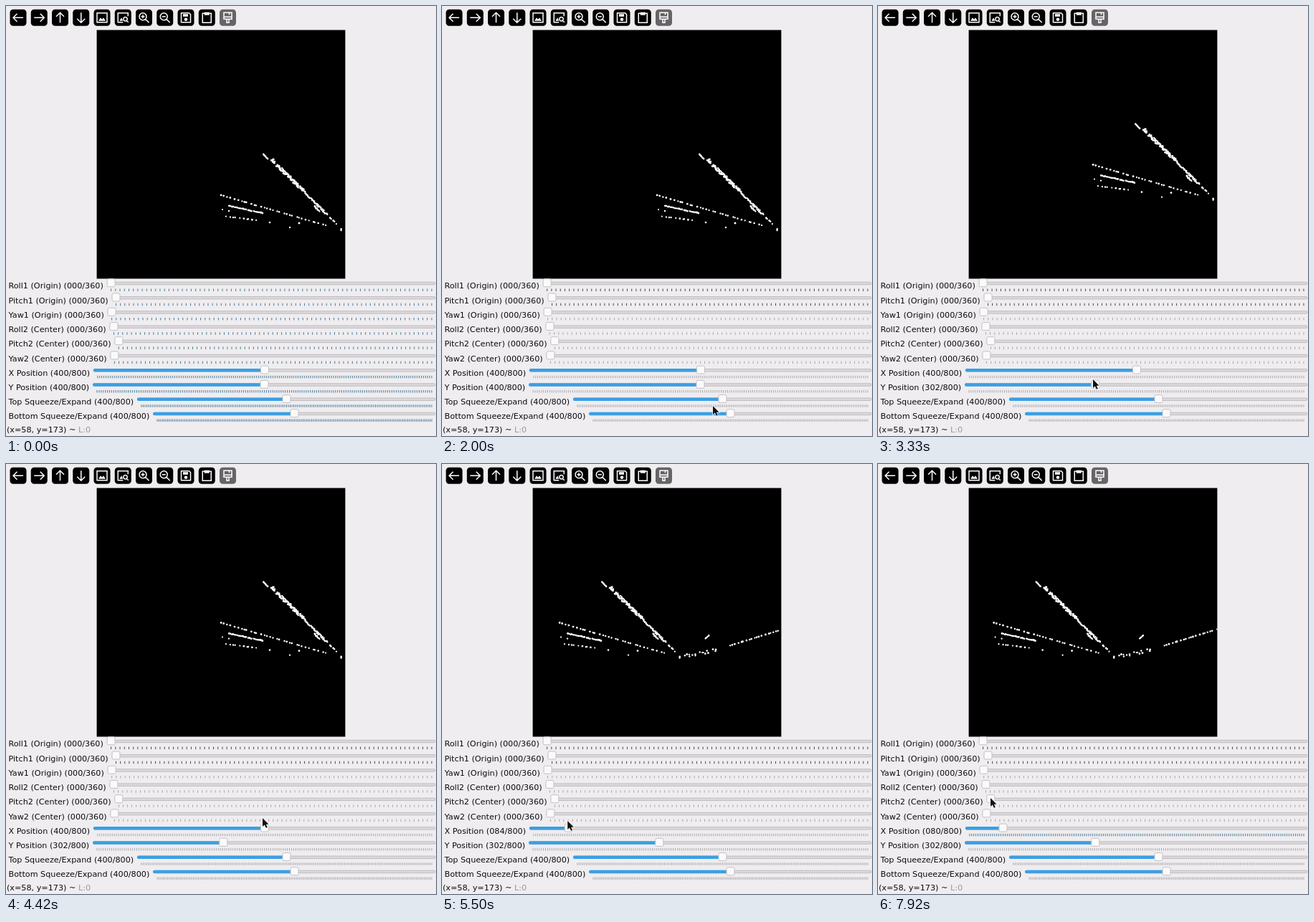
These frames come from a looping animation (600 by 600 pixels, 8 s). An HTML page with a canvas:

```html
<!DOCTYPE html>
<html>
<head>
<meta charset="utf-8">
<style>
html, body { margin: 0; width: 100%; height: 100%; overflow: hidden; background: #efedef; }
canvas { display: block; width: 600px; height: 600px; }
</style>
</head>
<body>
<canvas id="stage" width="600" height="600"></canvas>
<script>
const ctx = document.getElementById('stage').getContext('2d');
const LOOP = 8000, FPS = 12, VIEW_SCALE = 346 / 800;
const INK = '#0c0c0e', PAPER = '#efedef', BLUE = '#3a9fe3';

// Drags ease out towards the value where the mouse lets go
const drag = (start, length, from, to, power) => t => {
  const p = Math.min(1, Math.max(0, (t - start) / length));
  return to + (from - to) * (1 - p) ** power;
};
const xDrag = { start: 4.417, end: 5.597 };
const xPosition = drag(xDrag.start, 1.18, 400, 80, 1.765);
const yPosition = drag(2.92, 0.38, 400, 302, 1);

// Cursor stops: seconds, x, y
const stops = [
  [0.08, 1, 12], [0.83, 35, 273], [1.25, 116, 418], [2, 378, 558], [2.92, 358, 521], [3.3, 300, 521],
  [3.6, 300, 521], [4.417, 358, 494], [4.917, 358, 494], [5.5, 175, 498], [6.1, 173, 499],
  [6.75, 155, 462], [7.33, 156, 462], [7.91, 157, 466]
];

function cursorAt(t) {
  const i = stops.findIndex(s => s[0] > t);
  if (i < 0) return stops[stops.length - 1].slice(1);
  const [t0, x0, y0] = stops[i - 1], [t1, x1, y1] = stops[i], p = (t - t0) / (t1 - t0);
  return [x0 + (x1 - x0) * p, y0 + (y1 - y0) * p];
}

const sliders = [
  ...['Roll1 (Origin)', 'Pitch1 (Origin)', 'Yaw1 (Origin)', 'Roll2 (Center)', 'Pitch2 (Center)', 'Yaw2 (Center)']
    .map(name => ({ name, max: 360, value: () => 0 })),
  { name: 'X Position', max: 800, value: xPosition },
  { name: 'Y Position', max: 800, value: yPosition },
  { name: 'Top Squeeze/Expand', max: 800, value: () => 400 },
  { name: 'Bottom Squeeze/Expand', max: 800, value: () => 400 }
];

// Toolbar icons, drawn around their centre
const arrow = turns => ({ turns, line: 'M7 0H-7M-1.5 -5.5L-7 0L-1.5 5.5' });
const lens = 'M3.5 -1.5A5 5 0 1 1 -6.5 -1.5A5 5 0 1 1 3.5 -1.5M2 2L7 7M-4 -1.5H1';
const icons = [
  arrow(0), arrow(2), arrow(1), arrow(3),
  { line: 'M-7 -6.5H7V6.5H-7Z', fill: 'M-5 4.5L-2 0L0 2.5L2 0L5 4.5Z' },
  { line: 'M7 -2V-6.5H-7V6.5H0M6 2A2.7 2.7 0 1 1 .6 2A2.7 2.7 0 1 1 6 2M5 4L7.5 6.5', fill: 'M-5 4.5L-2 0L0 4.5Z' },
  { line: lens + 'M-1.5 -4V1' },
  { line: lens },
  { line: 'M-6.5 -6.5H4.5L6.5 -4.5V6.5H-6.5Z', fill: 'M-4 -5H3V-1.5H-4ZM2.3 2.5A2.3 2.3 0 1 1 -2.3 2.5A2.3 2.3 0 1 1 2.3 2.5' },
  { line: 'M-6 -6H6V7H-6Z', fill: 'M-3.5 -7.5H3.5V-3.5H-3.5Z' },
  { line: 'M-5.5 -7H5.5V2H-5.5ZM-5.5 -1H5.5M-1.5 2V7H1.5V2M2 -7V-4', gray: true }
];
const pointer = new Path2D('M0 0V12L2.8 9.5L4.8 13.8L6.8 12.9L4.9 8.8H8.6Z');

// Scan points in stage pixels, with both positions at 400
const scan = new Path2D();
let seed = 7;
const rand = () => (seed = seed * 16807 % 2147483647) / 2147483647;
const wobble = size => (rand() - 0.5) * size;

function dot(x, y) {
  const r = 1.3 + wobble(0.4);
  scan.moveTo(x + r, y);
  scan.arc(x, y, r, 0, 7);
}

// Unevenly spaced dots from a to b, scattered across the line
function streak(a, b, count, spread = 0.4) {
  for (let i = 0; i < count; i++) {
    const p = Math.min(1, Math.max(0, (i + wobble(0.9)) / (count - 1)));
    const off = wobble(spread);
    dot(a[0] + (b[0] - a[0]) * p + off, a[1] + (b[1] - a[1]) * p - off);
  }
}
streak([359, 207], [365, 213], 7);
streak([371, 214], [375, 219], 9, 3);
streak([378, 222], [414, 257], 80, 2.8);
streak([414, 257], [448, 291], 38, 1.6);
streak([430, 280], [438, 286], 8, 1.5);
streak([452, 296], [461, 304], 5, 1);
streak([300, 264], [446, 306], 33);
streak([311, 279], [358, 289], 26, 0.8);
streak([307, 293.5], [349, 299], 10);
streak([467, 312], [519, 302], 18, 6);
streak([504, 285.5], [508, 282], 5, 1);
streak([537, 296], [618, 271], 22);
[[302, 284], [311, 286], [368, 302], [396, 309], [409, 303]].forEach(p => dot(...p));

function box(x, y, w, h, r, fill, stroke) {
  ctx.beginPath();
  ctx.roundRect(x, y, w, h, r);
  ctx.fillStyle = fill;
  ctx.fill();
  if (stroke) { ctx.strokeStyle = stroke; ctx.lineWidth = 1; ctx.stroke(); }
}

function drawIcon({ line, fill, turns = 0, gray }, i) {
  ctx.save();
  ctx.translate(17 + i * 29.25, 16.2);
  box(-11.5, -11.5, 23, 23, 4.5, gray ? '#666467' : '#000');
  ctx.rotate(turns * Math.PI / 2);
  ctx.strokeStyle = ctx.fillStyle = '#fff';
  ctx.lineWidth = 1.5;
  ctx.stroke(new Path2D(line));
  if (fill) ctx.fill(new Path2D(fill));
  ctx.restore();
}

function drawView(x, y) {
  ctx.save();
  ctx.fillStyle = '#000';
  ctx.beginPath();
  ctx.rect(126.6, 33.6, 346.8, 346.8);
  ctx.fill();
  ctx.clip();
  ctx.translate((x - 400) * VIEW_SCALE, (y - 400) * VIEW_SCALE);
  ctx.fillStyle = '#fff';
  ctx.fill(scan);
  ctx.restore();
}

function tickColor(row, t) {
  if (t < 0.08 || (row === 6 && t > 6.1)) return '#4a7c99';
  return row < 2 ? '#4a494c' : '#a9a7aa';
}

// Returns the x of the knob
function drawSlider({ name, max, value }, row, t) {
  const y = 387 + row * 20.22, amount = value(t);
  const label = `${name} (${String(Math.round(amount)).padStart(3, '0')}/${max})`;
  const left = 8.3 + ctx.measureText(label).width, start = left + 6;
  const scale = (594 - start) / max, knob = start + amount * scale;
  ctx.fillStyle = INK;
  ctx.fillText(label, 3.5, y + 7.4);
  box(left + 0.5, y - 1.7, 598.5 - left, 3.4, 1.7, '#dbd9dc', '#bebcbf');
  if (amount > 0) box(left, y - 2.2, knob - left, 4.4, 2, BLUE);
  ctx.fillStyle = tickColor(row, t);
  for (let v = 0; v <= max; v += 5) ctx.fillRect(start + v * scale - 0.5, y + 7.5, 1, 3.5);
  box(knob - 5.5, y - 6.2, 11, 11, 2, '#fbfafb', '#c3c1c4');
  return knob;
}

function drawCursor(x, y) {
  ctx.save();
  ctx.translate(x, y);
  ctx.strokeStyle = '#fff';
  ctx.lineWidth = 1.4;
  ctx.stroke(pointer);
  ctx.fillStyle = '#111';
  ctx.fill(pointer);
  ctx.restore();
}

function draw(ms) {
  const t = Math.floor(ms * FPS / 1000 + 0.06) / FPS;
  const lag = t - 0.022; // the view trails the sliders a little
  ctx.fillStyle = PAPER;
  ctx.fillRect(0, 0, 600, 600);
  icons.forEach(drawIcon);
  drawView(xPosition(lag), yPosition(lag));
  ctx.font = '11.2px "DejaVu Sans", sans-serif';
  const knobs = sliders.map((s, row) => drawSlider(s, row, t));
  const status = '(x=58, y=173) ~ ';
  ctx.fillStyle = INK;
  ctx.fillText(status, 1, 595.2);
  ctx.fillStyle = '#9a989b';
  ctx.fillText('L:0', 1 + ctx.measureText(status).width, 595.2);
  if (t < stops[0][0]) return;
  const [x, y] = cursorAt(t);
  const dragging = t > xDrag.start && t < xDrag.end;
  drawCursor(dragging ? knobs[6] - 1.5 : x, y);
}

function frame() {
  draw(performance.now() % LOOP);
  requestAnimationFrame(frame);
}
frame();
</script>
</body>
</html>
```
